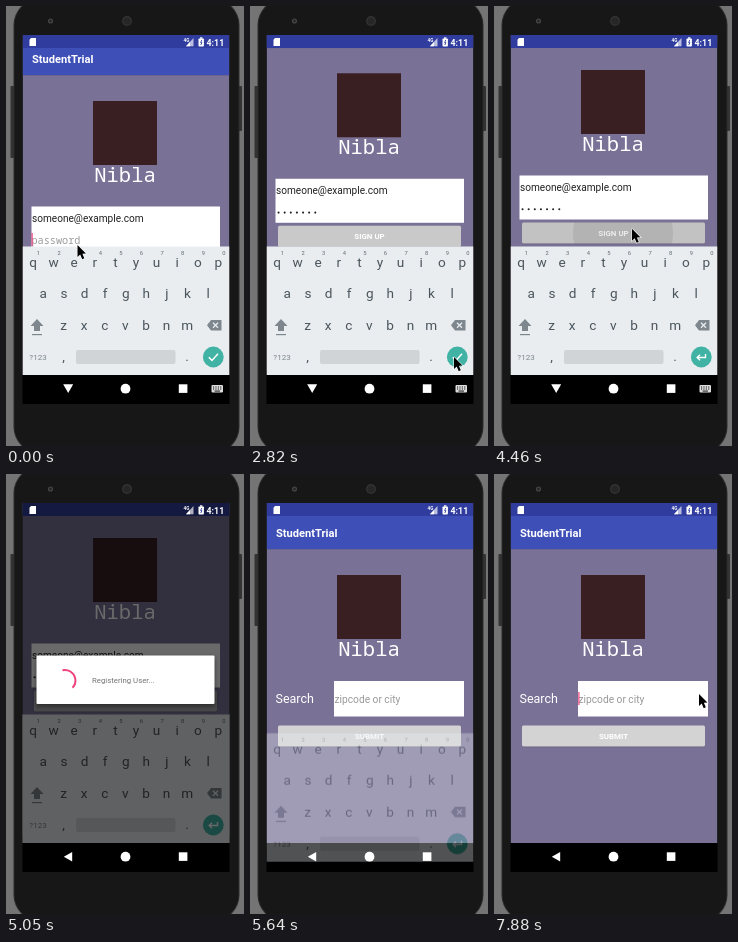
An HTML page with a canvas that plays this animation: 238 px wide and 440 px high, repeating every 8 s.

```html
<!DOCTYPE html>
<html lang="en">
<head>
<meta charset="utf-8">
<title>Sign up and search</title>
<style>
  html, body { margin: 0; width: 100%; height: 100%; overflow: hidden; background: #747474; }
  canvas { display: block; width: 238px; height: 440px; }
</style>
</head>
<body>
<canvas id="stage"></canvas>
<script>
const W = 238, H = 440, LOOP = 8000, TICK = 148.6;
const LEFT = 16.5, WIDE = 207;
const SANS = 'Roboto, "Liberation Sans", sans-serif';
const MONO = '"Noto Sans Mono", "DejaVu Sans Mono", monospace';
const PURPLE = '#7a7296', PINK = '#f0437c', TEAL = '#41b3a5';
const GREY = '#7d878d', INK = '#4a555c', BLUE = '#303d9f';
const SECRET = 'newuser';
const ratio = window.devicePixelRatio || 1;

function prepare(canvas) {
  canvas.width = W * ratio;
  canvas.height = H * ratio;
  const c = canvas.getContext('2d');
  c.scale(ratio, ratio);
  return c;
}
const stage = prepare(document.getElementById('stage'));
const layerCanvas = document.createElement('canvas');
const layer = prepare(layerCanvas);
let g = stage;

// Timing rules
const ramp = (t, from, to) => Math.min(1, Math.max(0, (t - from) / (to - from)));
const easeOut = (p, power) => 1 - (1 - p) ** power;
const blink = t => t >= 0 && t % 890 < 445;
const pan = t => -6 - 31 * easeOut(ramp(t, 2540, 2960), 2);

// Pointer legs: start, end, then where it arrives
const LEGS = [
  [1700, 2400, 204, 351], [2850, 3560, 105, 221], [3720, 3860, 122, 221],
  [4020, 4150, 130, 222], [4450, 4900, 245, 240], [6700, 7130, 205, 220]
];
function pointer(t) {
  let x = 71.5, y = 239;
  for (const [from, to, toX, toY] of LEGS) {
    const p = ramp(t, from, to);
    x += (toX - x) * easeOut(p, 4);
    y += (toY - y) * easeOut(p, 2);
  }
  return [x, y];
}

function typedCount(t) {
  const beat = Math.floor(t / (2 * TICK) + 0.01);
  return t < TICK / 2 ? 0 : Math.min(SECRET.length, 1 + Math.round(beat * 1.15));
}

// Drawing helpers
function rect(x, y, w, h, fill) {
  g.fillStyle = fill;
  g.fillRect(x, y, w, h);
}
function rounded(x, y, w, h, r, fill) {
  g.fillStyle = fill;
  g.beginPath();
  g.roundRect(x, y, w, h, r);
  g.fill();
}
function disc(x, y, r, fill) {
  g.fillStyle = fill;
  g.beginPath();
  g.arc(x, y, r, 0, Math.PI * 2);
  g.fill();
}
function trace(points) {
  g.beginPath();
  points.forEach(([x, y], i) => i ? g.lineTo(x, y) : g.moveTo(x, y));
}
function poly(points, fill) {
  trace(points);
  g.closePath();
  g.fillStyle = fill;
  g.fill();
}
function line(points, color, width) {
  trace(points);
  g.strokeStyle = color;
  g.lineWidth = width;
  g.stroke();
}
function text(str, x, y, size, color, { align = 'left', weight = 400, font = SANS } = {}) {
  g.font = `${weight} ${size}px ${font}`;
  g.textAlign = align;
  g.fillStyle = color;
  g.fillText(str, x, y);
}
function clipped(x, y, w, h, draw) {
  g.save();
  g.beginPath();
  g.rect(x, y, w, h);
  g.clip();
  draw();
  g.restore();
}
// Draws on a separate layer so overlapping parts fade as one
function faded(alpha, dy, draw) {
  if (!alpha) return;
  layer.clearRect(0, 0, W, H);
  g = layer;
  draw();
  g = stage;
  g.globalAlpha = alpha;
  g.drawImage(layerCanvas, 0, dy, W, H);
  g.globalAlpha = 1;
}

function phone() {
  rect(0, 0, W, H, '#747474');
  rounded(4.5, 80, 6, 72, 1, '#333');
  rounded(230, 80, 6, 45, 1, '#333');
  rounded(7.5, -7, 226, 454, 26, '#2c2c2c');
  rounded(8.5, -6, 224, 452, 25, '#171717');
  disc(44.5, 15, 2.6, '#444');
  disc(44.5, 15, 1.2, '#222');
  disc(121, 15, 5, '#333');
  disc(121, 15, 3.6, '#262626');
  rect(LEFT, 369, WIDE, 29, '#000');
}

function statusIcons() {
  poly([[25, 32], [30, 32], [30, 40], [23.5, 40], [23.5, 33.8]], '#fff');
  text('4G', 177.5, 36, 4.6, '#fff', { weight: 700 });
  poly([[187.5, 32], [187.5, 40.3], [180, 40.3]], '#ffffffaa');
  poly([[184, 36], [184, 40.3], [180, 40.3]], '#fff');
  rounded(192.5, 32.5, 5.4, 8, 0.8, '#fff');
  rect(194, 31.3, 2.4, 1.4, '#fff');
  line([[195.8, 34], [194.6, 36.6], [195.9, 36.6], [194.8, 39]], BLUE, 0.9);
  text('4:11', 218.2, 39.5, 8.8, '#fff', { align: 'right', weight: 700 });
}

function header() {
  rect(LEFT, 29, WIDE, 369, PURPLE);
  rect(LEFT, 42, WIDE, 33, '#3f4fb8');
  rect(LEFT, 75, WIDE, 1, '#6a6590');
  text('StudentTrial', 26, 63, 11.1, '#fff', { weight: 700 });
  rect(87, 101, 64, 64, '#3a1f22');
  text('Nibla', 119, 182, 20.5, '#fff', { align: 'center', font: MONO });
}

function button(label, y, fill) {
  rounded(28, y + 0.8, 183, 21, 1.5, '#00000033');
  rounded(28, y, 183, 21, 1.5, fill);
  text(label, 119.5, y + 13.3, 7.9, '#fff', { align: 'center', weight: 700 });
}

function password(t) {
  const count = typedCount(t), step = 6.12, x = 25.5;
  const masked = t > 2600 ? count : count - 1;
  if (!count) text('password', x, 244, 10.2, '#9c9c9c', { font: MONO });
  for (let i = 0; i < count; i++) {
    if (i < masked) disc(x + (i + 0.5) * step, 240.3, 1.05, '#222');
    else text(SECRET[i], x + i * step, 244, 10.2, '#333', { font: MONO });
  }
  if (t < 2600 && blink(Math.max(0, t - 1486))) rect(x + count * step, 233, 1.2, 13, PINK);
}

function signUp(t) {
  g.save();
  g.translate(0, pan(t));
  header();
  rect(25.5, 206.5, 188.5, 44, '#fff');
  text('someone@example.com', 26, 222, 10.1, '#222');
  password(t);
  button('SIGN UP', 253.5, t < 2960 ? '#c9c9c9' : '#c2c2c2');
  const ripple = 25 * Math.max(0, Math.floor((t - 3860) / (2 * TICK)));
  clipped(28, 253.5, 183, 21, () => disc(129, 264, ripple, '#00000014'));
  g.restore();
}

function search(t) {
  header();
  text('Search', 25.5, 229, 12.5, '#fff');
  rect(84, 207, 130, 35.5, '#fff');
  text('zipcode or city', 84.5, 229, 10.2, '#999');
  if (blink(t - 6080)) rect(84.3, 218, 1.2, 13, PINK);
  button('SUBMIT', 251.5, '#d3d3d3');
}

function keyRow(letters, x, y, size = 13.6, color = INK) {
  [...letters].forEach((ch, i) =>
    text(ch, x + i * 20.6, y, size, color, { align: 'center' }));
}

function keyboard(enter) {
  rect(LEFT, 240.5, WIDE, 128.5, '#e9edf0');
  keyRow('1234567890', 32.5, 248.7, 5.8, '#5f6a70');
  keyRow('qwertyuiop', 27, 261);
  keyRow('asdfghjkl', 37.3, 292);
  keyRow('zxcvbnm', 57.6, 324);
  poly([[31, 313], [37.5, 320], [34, 320], [34, 325], [28, 325], [28, 320], [24.5, 320]], GREY);
  rect(26, 328, 10, 1.2, GREY);
  poly([[205, 314], [215.5, 314], [215.5, 324.5], [205, 324.5], [201, 319.2]], GREY);
  line([[207, 316.8], [212, 321.8]], '#e9edf0', 1.3);
  line([[212, 316.8], [207, 321.8]], '#e9edf0', 1.3);
  text('?123', 32, 354, 8, GREY, { align: 'center' });
  text(',', 57.5, 354.5, 13.6, INK, { align: 'center' });
  rounded(70, 344, 99.5, 14, 2, '#d0d4d7');
  text('.', 181, 354.5, 13.6, INK, { align: 'center' });
  disc(207.3, 351, 10.4, TEAL);
  if (enter) {
    line([[211.5, 348], [211.5, 351.5], [203.5, 351.5]], '#fff', 1.4);
    line([[206, 348.8], [203.2, 351.5], [206, 354.2]], '#fff', 1.4);
  } else {
    line([[202.8, 351.2], [206, 354.4], [212, 347.8]], '#fff', 1.5);
  }
}

function navBar(withKeys) {
  if (withKeys) {
    poly([[57.2, 378.3], [67.2, 378.3], [62.2, 387]], '#fff');
    rounded(205.5, 379, 11.5, 7.5, 1, '#ddd');
    for (let i = 0; i < 8; i++)
      rect(207 + (i % 4) * 2.4, 380.5 + (i >> 2) * 2, 1.1, 1, '#000');
    rect(208.5, 384.6, 5.5, 0.9, '#000');
  } else {
    poly([[57.8, 382.7], [66.2, 378], [66.2, 387.4]], '#fff');
  }
  disc(119.5, 382.7, 4.9, '#fff');
  rect(172.8, 378.3, 8.6, 8.6, '#fff');
}

function dialog(t) {
  g.shadowColor = '#00000077';
  g.shadowBlur = 5 * ratio;
  g.shadowOffsetY = 2 * ratio;
  rounded(30.5, 181.5, 178, 48.5, 1, '#fff');
  g.shadowColor = 'transparent';
  const turn = (t - 5052) / 1333 * Math.PI * 2;
  g.beginPath();
  g.arc(58.8, 206.5, 10.6, turn - 1.8, turn + 0.75);
  g.strokeStyle = PINK;
  g.lineWidth = 2;
  g.stroke();
  text('Registering User...', 86, 208.8, 7.8, '#757575');
}

function mouse(x, y) {
  const arrow = [[0, 0], [0, 12], [2.7, 9.6], [4.7, 14.2], [6.8, 13.3], [4.9, 8.8], [8.4, 8.6]]
    .map(([a, b]) => [x + a, y + b]);
  line([...arrow, arrow[0]], '#ffffffcc', 1.4);
  poly(arrow, '#000');
}

function render(t) {
  const opening = ramp(t, 4458, 4750), leaving = ramp(t, 5202, 5495);
  const hiding = ramp(t, 5500, 5790);
  phone();
  clipped(LEFT, 29, WIDE, 369, () => {
    clipped(LEFT, 29, WIDE, 340, () => {
      if (leaving < 1) signUp(t);
      faded(leaving, 0, () => search(t));
      rect(LEFT, 29, WIDE, 13, BLUE);
    });
    faded((1 - hiding) ** 1.5, 37 * hiding, () => keyboard(t > 2960));
    rect(LEFT, 29, WIDE, 340, `rgba(0,0,0,${0.59 * opening * (1 - leaving)})`);
    statusIcons();
    navBar(opening < 1);
    faded(opening * (1 - ramp(t, 5202, 5340)), 0, () => dialog(t));
  });
  mouse(...pointer(t));
}

// The screen refreshes in even ticks
const start = performance.now();
function loop() {
  const t = (performance.now() - start) % LOOP;
  render(Math.floor((t + 8) / TICK) * TICK);
  requestAnimationFrame(loop);
}
loop();
</script>
</body>
</html>
```
